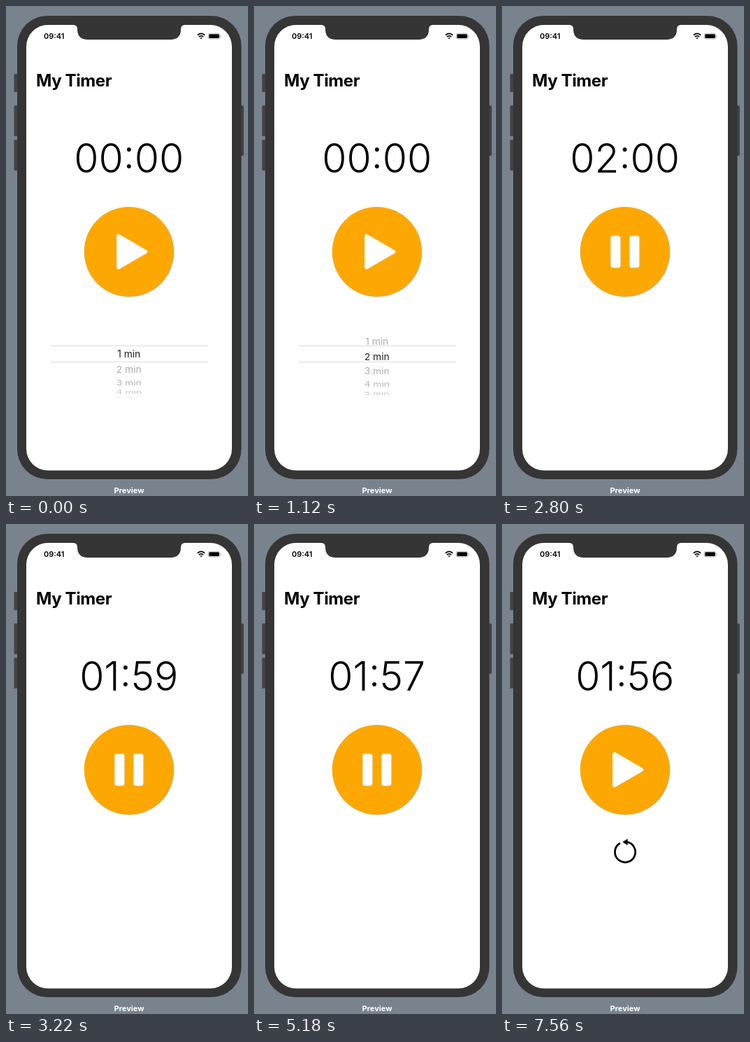
Recreate the animation shown at these times as an HTML page. Size 346 by 700 pixels, loop 9.03 s.

```html
<!DOCTYPE html>
<html lang="en">
<meta charset="utf-8">
<title>Timer preview</title>
<style>
  html, body { margin: 0; width: 100%; height: 100%; overflow: hidden; background: #79838e; }
  svg { display: block; width: 346px; height: 700px; font-family: Inter, "Liberation Sans", sans-serif; }
  .row { font-size: 13.8px; text-anchor: middle; }
</style>
<svg viewBox="0 0 346 700">
  <defs>
    <clipPath id="band"><rect x="60" y="486" width="232" height="22"/></clipPath>
    <clipPath id="wheel"><rect x="60" y="436" width="232" height="123"/></clipPath>
  </defs>

  <g fill="#424345">
    <rect x="11.5" y="97" width="8" height="26" rx="1.5"/>
    <rect x="11.5" y="142" width="8" height="44" rx="1.5"/>
    <rect x="11.5" y="191" width="8" height="44" rx="1.5"/>
    <rect x="332" y="142" width="8" height="72" rx="1.5"/>
  </g>
  <rect x="16" y="14" width="320.5" height="662" rx="43" fill="#353535"/>
  <rect x="29" y="27" width="294" height="636.5" rx="31" fill="#fff"/>
  <path d="M96 26V27Q102 27 102 33Q102 48 117 48H235Q250 48 250 33Q250 27 256 27V26Z" fill="#353535"/>

  <text x="54" y="47" font-size="11" font-weight="600">09:41</text>
  <g fill="none" stroke="#000" stroke-width="1.7">
    <path d="M273.8 41.6Q279 37.2 284.2 41.6M275.9 44Q279 41.4 282.1 44"/>
    <path d="M279 47.2L277.4 45.5Q279 44.3 280.6 45.5Z" fill="#000" stroke="none"/>
  </g>
  <rect x="289.2" y="39.2" width="16.6" height="8" rx="2.2" fill="none" stroke="#aaa" stroke-width=".8"/>
  <rect x="290.3" y="40.3" width="14.4" height="5.8" rx="1.2"/>
  <path d="M307 42V45" stroke="#aaa"/>

  <text x="43" y="115" font-size="24" font-weight="700" letter-spacing="-.4">My Timer</text>
  <text id="clock" x="175.7" y="237.5" font-size="57" font-weight="300" text-anchor="middle"></text>

  <circle cx="176.3" cy="351.7" r="64" fill="#b9b5ad"/>
  <circle cx="175.7" cy="351" r="64" fill="#fda802"/>
  <path id="play" d="M161 329V373L199 351Z" fill="#fff" stroke="#fff" stroke-width="6" stroke-linejoin="round"/>
  <g id="pause" fill="#fff" stroke="#e9d3a4" stroke-width=".8">
    <rect x="155.3" y="328.3" width="14" height="45.6" rx="3"/>
    <rect x="182.3" y="328.3" width="14" height="45.6" rx="3"/>
  </g>

  <g id="picker">
    <g id="dim" clip-path="url(#wheel)"></g>
    <rect x="60" y="486" width="232" height="22" fill="#fff"/>
    <g id="lit" clip-path="url(#band)" fill="#222"></g>
    <path d="M63 485.5H289M63 508.5H289" stroke="#ddd"/>
  </g>

  <g id="reset">
    <path d="M178 454.2A14.6 14.6 0 1 1 168 456.5" fill="none" stroke="#000" stroke-width="2.7" stroke-linecap="round"/>
    <path d="M172.4 454.2L179.6 449.8V459Z"/>
  </g>

  <text x="176" y="695.5" font-size="11" font-weight="700" fill="#fff" text-anchor="middle">Preview</text>
</svg>
<script>
  const LOOP = 9030, STEP = 70, START = 2100, PAUSE = 6930;
  const RADIUS = 63, PITCH = 0.349, CENTER = 497.3;
  const $ = id => document.getElementById(id);
  const show = (id, on) => $(id).style.display = on ? '' : 'none';

  const addRows = id => [1, 2, 3, 4, 5, 6].map(n => {
    const row = document.createElementNS('http://www.w3.org/2000/svg', 'text');
    row.setAttribute('class', 'row');
    row.textContent = n + ' min';
    return $(id).appendChild(row);
  });
  const dim = addRows('dim'), lit = addRows('lit');

  const ease = x => x < 0.5 ? 4 * x ** 3 : 1 - 4 * (1 - x) ** 3;

  function turnWheel(pos) {
    dim.forEach((row, i) => {
      const angle = (i - pos) * PITCH;
      const y = CENTER + RADIUS * Math.sin(angle);
      const squash = Math.max(Math.cos(angle), 0);
      const place = `translate(175.7 ${y}) scale(1 ${squash}) translate(0 5)`;
      row.setAttribute('transform', place);
      row.setAttribute('opacity', 0.34 * Math.sqrt(squash));
      lit[i].setAttribute('transform', place);
      row.style.display = Math.abs(angle) < 1.5 ? '' : 'none';
    });
  }

  function clockText(t) {
    if (t < START) return '00:00';
    const left = 120 - [3080, 4130, 5110, 6230].filter(at => t >= at).length;
    return [Math.floor(left / 60), left % 60].map(n => String(n).padStart(2, '0')).join(':');
  }

  function draw(now) {
    const t = Math.floor(now % LOOP / STEP) * STEP;
    const running = t >= START && t < PAUSE;
    $('clock').textContent = clockText(t);
    show('play', !running);
    show('pause', running);
    show('picker', t < START);
    show('reset', t >= PAUSE);
    turnWheel(ease(Math.min(Math.max((t - 840) / 420, 0), 1)));
    requestAnimationFrame(draw);
  }
  draw(0);
</script>
</html>
```
